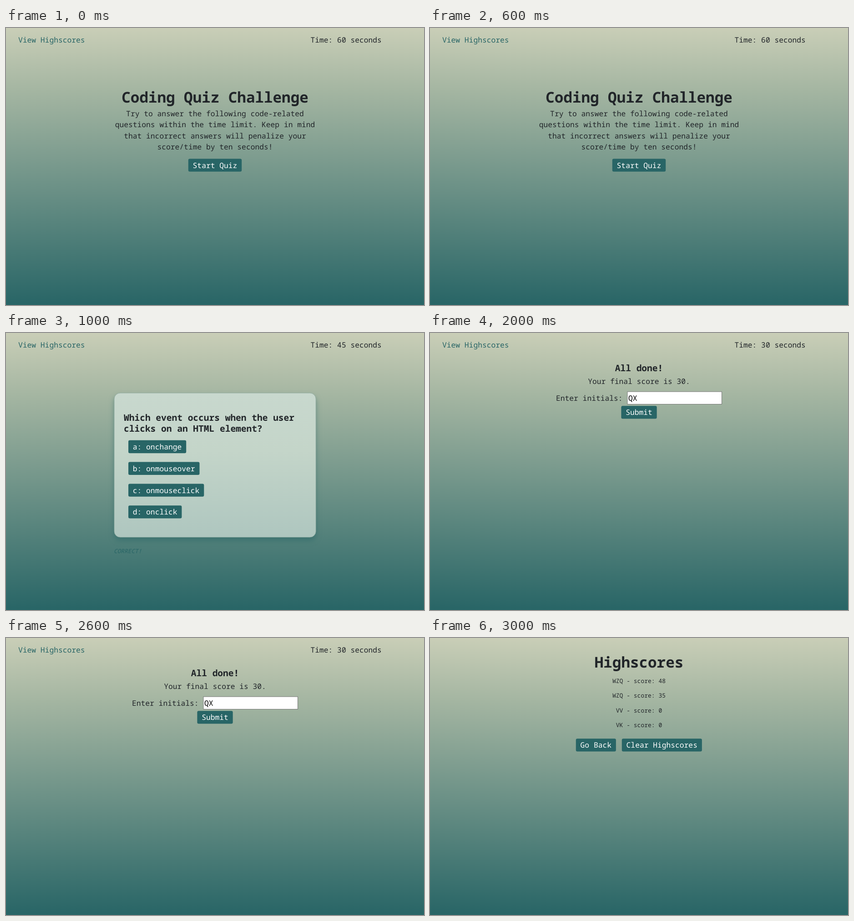
Recreate the animation shown at these times as an HTML page. Size 919 by 609 pixels, loop 4 s.

```html
<!DOCTYPE html>
<html lang="en">
<head>
<meta charset="utf-8">
<title>Coding Quiz</title>
<style>
  html, body { margin: 0; width: 100%; height: 100%; overflow: hidden; }
  svg { display: block; width: 100%; height: 100%; }
  text {
    font: 16.3px "Roboto Mono", "Noto Sans Mono", "DejaVu Sans Mono", monospace;
    fill: #212529;
    text-rendering: geometricPrecision;
    white-space: pre;
  }
  .mid { text-anchor: middle; }
  .h1 { font-size: 32.6px; font-weight: 700; }
  .h2 { font-size: 19.55px; font-weight: 700; }
  .small { font-size: 13.03px; }
  .note { font-size: 12.8px; font-style: italic; }
  .teal { fill: #286566; }
  .white { fill: #fff; }
  .black { fill: #000; }
  .card { filter: drop-shadow(0 7px 6px rgba(40, 101, 102, .5)); }
</style>
</head>
<body>
<svg viewBox="0 0 919 609" preserveAspectRatio="none">
  <defs>
    <linearGradient id="sky" x2="0" y2="1">
      <stop stop-color="#c9ceb7"/>
      <stop offset=".22" stop-color="#a5b6a2"/>
      <stop offset="1" stop-color="#286566"/>
    </linearGradient>
    <linearGradient id="glass" x2="0" y2="1">
      <stop stop-color="#c8d8ce"/>
      <stop offset=".4" stop-color="#c4d5c9"/>
      <stop offset="1" stop-color="#aec6bf"/>
    </linearGradient>
  </defs>
  <rect width="919" height="609" fill="url(#sky)"/>
  <g id="stage"></g>
</svg>
<script>
const stage = document.getElementById('stage');
const CENTER = 459.5, CHAR = 9.78;

const text = (s, x, y, cls = '') => `<text x="${x}" y="${y}" class="${cls}">${s}</text>`;
const mid = (s, y, cls = '') => text(s, CENTER, y, 'mid ' + cls);
const lines = (list, y, step, cls) => list.map((s, i) => mid(s, y + i * step, cls)).join('');

const button = (s, x, y) =>
  `<rect x="${x}" y="${y}" width="${s.length * CHAR + 19.6}" height="28.4" rx="3.3" class="teal"/>` +
  text(s, x + 9.8, y + 20.2, 'white');

const header = seconds =>
  text('View Highscores', 27, 31.5, 'teal') + text(`Time: ${seconds} seconds`, 669.5, 31.5);

const start = header(60) +
  mid('Coding Quiz Challenge', 164, 'h1') +
  lines(['Try to answer the following code-related',
    'questions within the time limit. Keep in mind',
    'that incorrect answers will penalize your',
    'score/time by ten seconds!'], 194, 24.45) +
  button('Start Quiz', 400.8, 287.4);

const question = header(45) +
  '<rect x="238" y="132" width="443.2" height="317" rx="13" fill="url(#glass)" stroke="#8fa99f" stroke-width=".8" class="card"/>' +
  text('Which event occurs when the user', 259, 193, 'h2') +
  text('clicks on an HTML element?', 259, 216.5, 'h2') +
  ['a: onchange', 'b: onmouseover', 'c: onmouseclick', 'd: onclick']
    .map((s, i) => button(s, 269, 235.8 + i * 47.8)).join('') +
  text('CORRECT!', 237, 483.5, 'note teal');

const done = header(30) +
  mid('All done!', 84, 'h2') +
  mid('Your final score is 30.', 112) +
  text('Enter initials:', 277, 149) +
  '<rect x="434" y="129" width="207.5" height="27.5" fill="#fff" stroke="#767676"/>' +
  text('QX', 436, 149, 'black') +
  button('Submit', 420.4, 160.2);

const scores = mid('Highscores', 65, 'h1') +
  lines(['WZQ - score: 48', 'WZQ - score: 35', 'VV - score: 0', 'VK - score: 0'], 98.5, 32.55, 'small') +
  button('Go Back', 320.8, 221.2) +
  button('Clear Highscores', 421.8, 221.2);

const scenes = [start, question, done, scores];
let shown = -1;

function draw(now) {
  const i = Math.floor(now / 1000) % scenes.length;
  if (i !== shown) stage.innerHTML = scenes[shown = i];
  requestAnimationFrame(draw);
}
draw(performance.now());
</script>
</body>
</html>
```
